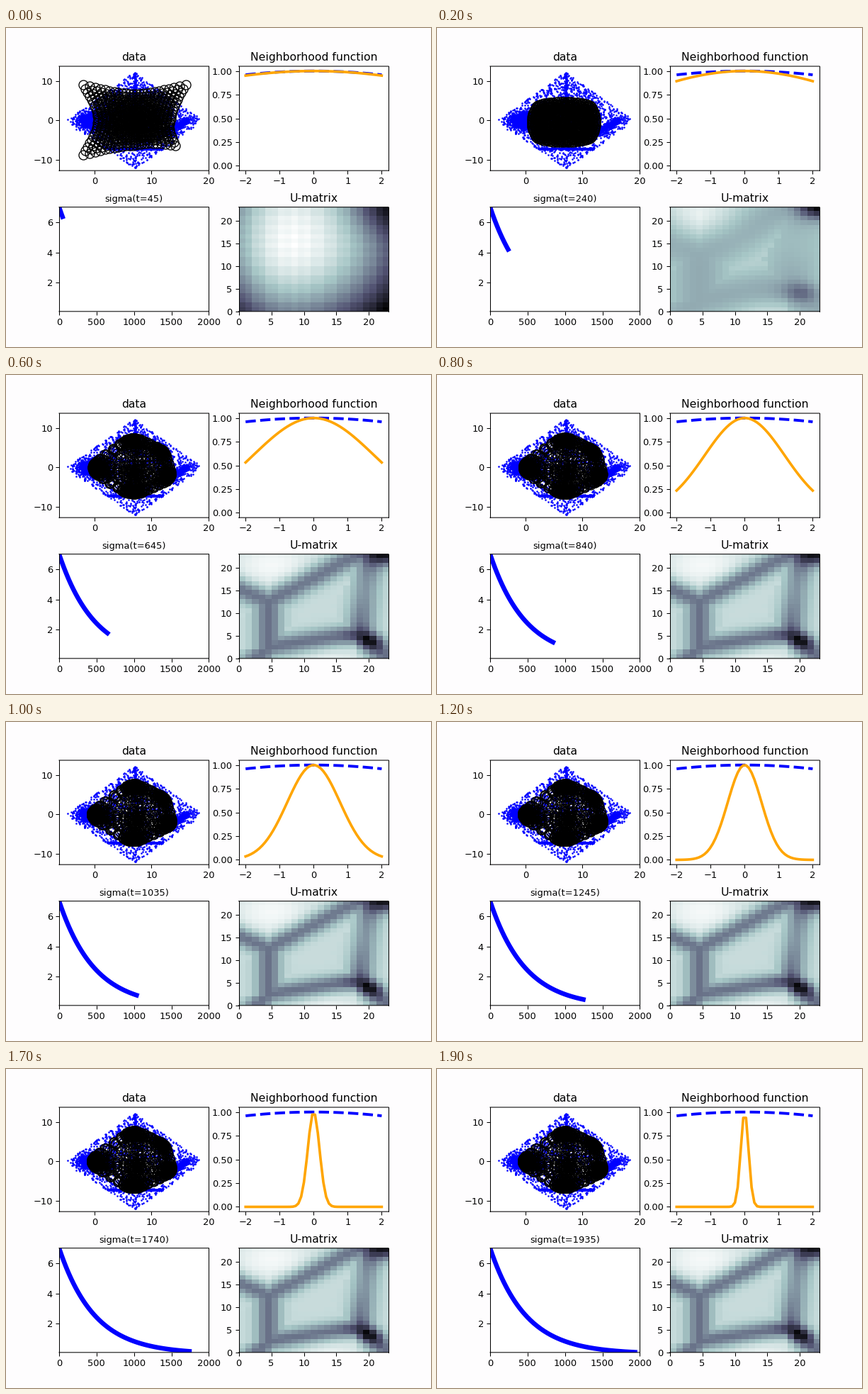
These frames come from a looping animation (600 by 450 pixels, 2 s). A matplotlib script:

```python
import numpy as np
import matplotlib.pyplot as plt
from matplotlib.animation import FuncAnimation

FRAMES, STEPS, CELLS, SIDE = 20, 2000, 23, 24
rng = np.random.default_rng(7)

fig, ((ax_data, ax_hood), (ax_sigma, ax_umat)) = plt.subplots(
    2, 2, figsize=(6.4, 4.8), dpi=93.75, facecolor="#fefdfe")
fig.subplots_adjust(left=0.125, right=0.9, bottom=0.1115, top=0.88,
                    wspace=0.2, hspace=0.35)


def sigma(t):
    return 7 * (0.1 / 7) ** (t / STEPS)


def hood(x, s):
    return np.exp(-x ** 2 / (2 * s ** 2))


def bump(x, y, cx, cy, sx, sy):
    return hood(x - cx, sx) * hood(y - cy, sy)


# ---- data cloud: a sparse diamond with dense clusters inside
def make_cloud():
    a, b = rng.uniform(-1, 1, (2, 1600))
    diamond = np.c_[7 + 6 * (a + b), 6.2 * (a - b)]
    ball = rng.normal(0, 1, (1700, 2)) * [1.25, 1.05]
    spine = np.c_[rng.normal(7.1, 0.09, 160), rng.uniform(3, 12.3, 160)]
    floor = np.c_[rng.uniform(2.2, 12, 260), rng.normal(-7.2, 0.14, 260)]
    s = rng.uniform(0, 1, 420) ** 1.4
    arm = np.c_[12.6 + 4 * s + rng.normal(0, 0.3, 420),
                -3 + 3.4 * s + rng.normal(0, 0.45, 420)]
    return np.vstack([diamond, ball, spine, floor, arm])


# ---- neuron net: a stretched grid shrinks, then is drawn to the clusters
u, v = [g.ravel() for g in np.meshgrid(*2 * [np.linspace(-1, 1, SIDE)])]
disc = np.c_[u * np.sqrt(1 - v ** 2 / 2), v * np.sqrt(1 - u ** 2 / 2)]
wobble = rng.normal(0, 0.16, disc.shape) * (1 - np.maximum(abs(u), abs(v)))[:, None]

# place on the disc, centre in the data
CLUSTERS = np.array([(-.8, 0, 0, 0), (-.05, .8, 7, 7.4), (.8, -.25, 13.1, -2.3),
                     (0, -.8, 6.9, -6.4), (.7, .65, 12, 4.5), (0, 0, 7.2, -1)])


def net_start():
    p, q = [0.78 * g + 0.22 * g ** 3 for g in (u, v)]
    dent = np.clip(u, 0, 1) * np.clip(-v, 0, 1)
    return np.c_[7 + p * (6.4 + 2.6 * v ** 2) - 1.8 * dent,
                 0.2 + q * (6.6 + 2.4 * u ** 2) + 2.4 * dent]


def net_shrunk():
    return [6.7, -0.4] + (disc + 0.4 * (np.c_[u, v] - disc)) * [5.6, 5.2]


def net_clustered(reach=0.28):
    away = disc[:, None] - CLUSTERS[:, :2]
    pull = np.exp(-(away ** 2).sum(2) / (2 * reach ** 2))
    pull /= pull.sum(1, keepdims=True)
    return (pull[..., None] * (CLUSTERS[:, 2:] + away * [2.6, 2.5])).sum(1)


START, SHRUNK, CLUSTERED = net_start(), net_shrunk(), net_clustered()


def neurons(i):
    shrink = min(i / 2, 1)
    split = np.interp(i, [2, 4, 6, 10], [0, 0.6, 0.88, 1])
    xy = START + shrink * (SHRUNK - START) + split * (CLUSTERED - SHRUNK)
    return (xy + wobble).T


# ---- U-matrix: ridges run along the borders between five regions
REGIONS = np.array([(3.9, 19.4), (-2, 10), (11, 10), (13.6, -1.5), (26.6, 8.4)])
X, Y = np.meshgrid(np.arange(CELLS) + 0.5, np.arange(CELLS) + 0.5)
weave = 0.02 * (X.astype(int) % 2 + Y.astype(int) % 2 - 1)


def border_distance():
    d = np.hypot(X[..., None] - REGIONS[:, 0], Y[..., None] - REGIONS[:, 1])
    order = np.argsort(d, axis=2)
    near, second = order[..., 0], order[..., 1]
    gap = np.linalg.norm(REGIONS[near] - REGIONS[second], axis=2)
    d.sort(axis=2)
    return (d[..., 1] ** 2 - d[..., 0] ** 2) / (2 * gap)


BORDER = border_distance()
HEIGHT = (0.44 + 0.55 * bump(X, Y, 20, 4.2, 2, 1.6)
          - 0.14 * bump(X, Y, 20, 15, 3, 4))
BASE = (0.16 - 0.13 * bump(X, Y, 5, 20.5, 4.5, 3.5)
        - 0.09 * bump(X, Y, 14, 0, 3.5, 2))


def umat_start():
    dx = (X - 8) / np.where(X < 8, 12, 17)
    dy = (Y - 15.5) / np.where(Y < 15.5, 15.5, 19)
    z = 0.02 + 0.75 * dx ** 2 + 0.47 * dy ** 2
    return z + 0.3 * bump(X, Y, 23, 23, 4, 4) + weave


def umat_ridges(width, gain):
    corner = 0.7 * bump(X, Y, 23, 23, 2.2, 1.7)
    return BASE + (1 - BASE) * gain * HEIGHT * hood(BORDER, width) + corner


def umat(i):
    z = umat_ridges(np.interp(i, [2, 4, 6, 10], [3.8, 2, 1.5, 1.35]),
                    np.interp(i, [2, 4, 6], [0.5, 0.86, 1]))
    mix = min(i / 2, 1)
    return np.clip(umat_start() * (1 - mix) + z * mix, 0, 1)


# ---- panels
ax_data.plot(*make_cloud().T, "o", color="blue", ms=2, mew=0)
net, = ax_data.plot([], [], "o", mfc="none", mec="black", ms=10, mew=1)
ax_data.set(title="data", xlim=(-6.2, 20.05), ylim=(-12.81, 13.85))

xs = np.linspace(-2, 2, 50)
ax_hood.plot(xs, hood(xs, 7), "--", color="blue", lw=3)
bell, = ax_hood.plot([], [], color="orange", lw=2.8)
ax_hood.set(title="Neighborhood function", xlim=(-2.2, 2.2),
            ylim=(-0.05, 1.05), xticks=range(-2, 3))

decay, = ax_sigma.plot([], [], color="blue", lw=5)
ax_sigma.set(xlim=(0, STEPS), ylim=(0.1, 7), yticks=(2, 4, 6))
label = ax_sigma.set_title("", fontsize=10)

tiles = ax_umat.imshow(umat(0), cmap="bone_r", vmin=0, vmax=1, origin="lower",
                       extent=(0, CELLS, 0, CELLS), aspect="auto",
                       interpolation="nearest")
ax_umat.set(title="U-matrix", xticks=range(0, 21, 5), yticks=range(0, 21, 5))

for ax in fig.axes:
    ax.spines[["top", "bottom"]].set_snap(False)


def update(i):
    t = 45 + 15 * (20 * i // 3)
    net.set_data(*neurons(i))
    bell.set_data(xs, hood(xs, sigma(t)))
    steps = np.arange(0, t + 1, 15)
    decay.set_data(steps, sigma(steps))
    label.set_text(f"sigma(t={t})")
    tiles.set_data(umat(i))
    return net, bell, decay, label, tiles


anim = FuncAnimation(fig, update, frames=FRAMES, interval=100,
                     init_func=lambda: update(0), repeat=True, repeat_delay=0)
plt.show()
```
